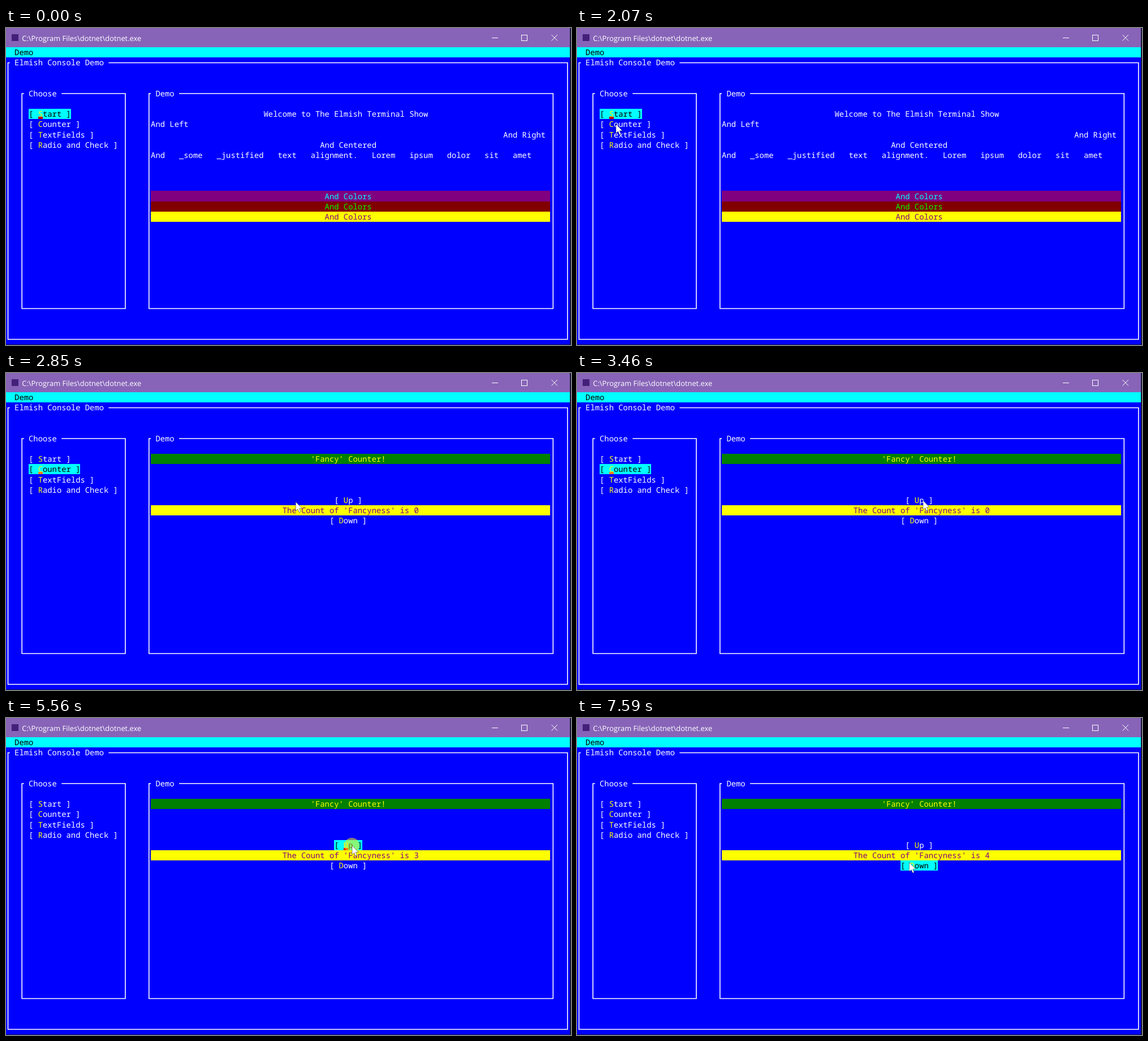
Animation, 999 px wide and 561 px high, one loop 8000 ms. Source, as an HTML page with a canvas:

```html
<!DOCTYPE html>
<html lang="en">
<head>
<meta charset="utf-8">
<title>Console Demo</title>
<style>
html, body { margin: 0; width: 100%; height: 100%; overflow: hidden; background: #14183a; }
canvas { display: block; width: 100vw; height: 100vh; }
</style>
</head>
<body>
<canvas id="stage" width="999" height="561"></canvas>
<script>
const ctx = document.getElementById('stage').getContext('2d');
const LOOP = 8000;
const CELL_W = 8.31, CELL_H = 18.17;
const BLUE = '#0000ff', CYAN = '#00ffff', YELLOW = '#ffff00', WHITE = '#ffffff';
const PURPLE = '#800080', MAROON = '#800000', GREEN = '#008000';

const colX = c => c * CELL_W - 1.5;
const rowY = r => 34 + r * CELL_H;

// Pointer moves: first time, last time, steps, end x, end y
const MOVES = [
  [540, 690, 3, 278, 240],
  [920, 1150, 4, 58, 149],
  [1380, 1610, 4, 70, 167],
  [1770, 1845, 2, 68.5, 169.5],
  [2240, 2240, 1, 104, 170],
  [2315, 2470, 3, 435, 215],
  [2700, 3010, 5, 627, 246],
  [3085, 3160, 2, 620, 236],
  [3310, 3460, 3, 611.5, 225],
  [6260, 6410, 3, 589, 255],
  [6670, 6670, 1, 587, 255]
];
const CLICKS = [[1920, 2070], [3540, 3695], [3930, 4000], [4170, 4320],
  [4550, 4700], [5100, 5250], [5560, 5710]];
const COUNTS = [3695, 4320, 4700, 5710];

function rect(x, y, w, h, color) {
  ctx.fillStyle = color;
  ctx.fillRect(x, y, w, h);
}

function bar(col, row, cols, color) {
  const x = Math.round(colX(col)), y = Math.round(rowY(row));
  rect(x, y, Math.round(colX(col + cols)) - x, Math.round(rowY(row + 1)) - y, color);
}

function text(str, col, row, color) {
  ctx.fillStyle = color;
  ctx.font = '13.85px "Noto Sans Mono", "DejaVu Sans Mono", monospace';
  [...str].forEach((ch, i) => {
    if (ch !== ' ') ctx.fillText(ch, colX(col + i), rowY(row) + 14.3);
  });
}

function banner(str, col, row, color, back) {
  bar(31, row, 85, back);
  text(str, col, row, color);
}

function button(label, col, row, focused, caret) {
  const str = `[ ${label} ]`;
  if (focused) bar(col, row, str.length, CYAN);
  text(str, col, row, focused ? '#000000' : WHITE);
  if (focused) bar(col + 2, row, 1, CYAN);
  else bar(col + 2, row, 1, BLUE);
  text(label[0], col + 2, row, YELLOW);
  if (focused && caret) {
    rect(Math.round(colX(col + 2)), Math.round(rowY(row + 1)) - 4, 8, 4, caret);
  }
}

function frame(title, left, top, right, bottom, col, row) {
  ctx.strokeStyle = WHITE;
  ctx.lineWidth = 1.6;
  ctx.beginPath();
  ctx.moveTo(colX(col + 3 + title.length), top);
  ctx.lineTo(right, top);
  ctx.lineTo(right, bottom);
  ctx.lineTo(left, bottom);
  ctx.lineTo(left, top);
  ctx.lineTo(colX(col + 1), top);
  ctx.stroke();
  text(title, col + 2, row, WHITE);
}

function titleBar() {
  rect(0, 0, 997, 34, '#8764b8');
  rect(10, 11, 12, 12, '#43217a');
  ctx.fillStyle = WHITE;
  ctx.font = '12.87px "Open Sans", "Noto Sans", sans-serif';
  ctx.fillText('C:\\Program Files\\dotnet\\dotnet.exe', 28.3, 22.5);
  ctx.strokeStyle = WHITE;
  ctx.lineWidth = 1;
  ctx.strokeRect(911.5, 12.5, 10, 10);
  ctx.beginPath();
  ctx.moveTo(859, 17.5);
  ctx.lineTo(870, 17.5);
  ctx.moveTo(964.5, 12);
  ctx.lineTo(975, 22.5);
  ctx.moveTo(975, 12);
  ctx.lineTo(964.5, 22.5);
  ctx.stroke();
}

function startPage() {
  text('Welcome to The Elmish Terminal Show', 55, 6, WHITE);
  text('And Left', 31, 7, WHITE);
  text('And Right', 106, 8, WHITE);
  text('And Centered', 67, 9, WHITE);
  const words = 'And _some _justified text alignment. Lorem ipsum dolor sit amet';
  text(words.split(' ').join('   '), 31, 10, WHITE);
  banner('And Colors', 68, 14, CYAN, PURPLE);
  banner('And Colors', 68, 15, '#00ff00', MAROON);
  banner('And Colors', 68, 16, PURPLE, YELLOW);
}

function counterPage(t, focus) {
  const count = COUNTS.filter(at => t >= at).length;
  banner("'Fancy' Counter!", 65, 6, YELLOW, GREEN);
  button('Up', 70, 10, focus === 'Up', '#f00000');
  banner(`The Count of 'Fancyness' is ${count}`, 59, 11, PURPLE, YELLOW);
  button('Down', 69, 12, focus === 'Down');
}

function pointerAt(t) {
  let x = 1008, y = 621;
  for (const [t0, t1, steps, endX, endY] of MOVES) {
    if (t < t0) break;
    const gap = steps > 1 ? (t1 - t0) / (steps - 1) : 1;
    const k = Math.min(1, (Math.floor((t - t0) / gap + 1e-6) + 1) / steps);
    x += (endX - x) * k;
    y += (endY - y) * k;
  }
  return [x, y];
}

function pointer(t) {
  if (t < MOVES[0][0]) return;
  const [x, y] = pointerAt(t);
  if (CLICKS.some(([on, off]) => t >= on && t < off)) {
    ctx.fillStyle = 'rgba(255, 240, 0, 0.52)';
    ctx.beginPath();
    ctx.arc(x, y + 0.5, 13.4, 0, Math.PI * 2);
    ctx.fill();
  }
  const path = new Path2D('M.4 .6V16.8L4.1 13.4L6.6 19.3L9.2 18.2L6.8 12.4H11.8Z');
  ctx.save();
  ctx.translate(x, y);
  ctx.fillStyle = WHITE;
  ctx.fill(path);
  ctx.strokeStyle = 'rgba(0, 0, 0, 0.65)';
  ctx.lineWidth = 0.7;
  ctx.stroke(path);
  ctx.restore();
}

function focusAt(t) {
  if (t < 2240) return 'Start';
  if (t < COUNTS[0]) return 'Counter';
  return t < 7590 ? 'Up' : 'Down';
}

function draw(t) {
  const focus = focusAt(t);
  rect(0, 0, 999, 561, '#14183a');
  rect(0, 34, 997, 526, BLUE);
  titleBar();
  rect(0, 34, 997, 18, CYAN);
  text('Demo', 2, 0, '#000000');
  frame('Elmish Console Demo', 3.5, 61.5, 992.8, 551, 0, 1);
  frame('Choose', 28.2, 116, 211, 496.5, 3, 4);
  frame('Demo', 252.8, 116, 967.3, 496.5, 30, 4);

  button('Start', 5, 6, focus === 'Start', '#b8000c');
  button('Counter', 5, 7, focus === 'Counter', '#f08010');
  button('TextFields', 5, 8, false);
  button('Radio and Check', 5, 9, false);

  if (t < 2240) startPage();
  else counterPage(t, focus);
  pointer(t);
}

ctx.textRendering = 'geometricPrecision';
const began = performance.now();
function tick() {
  draw((performance.now() - began) % LOOP);
  requestAnimationFrame(tick);
}
tick();
</script>
</body>
</html>
```
